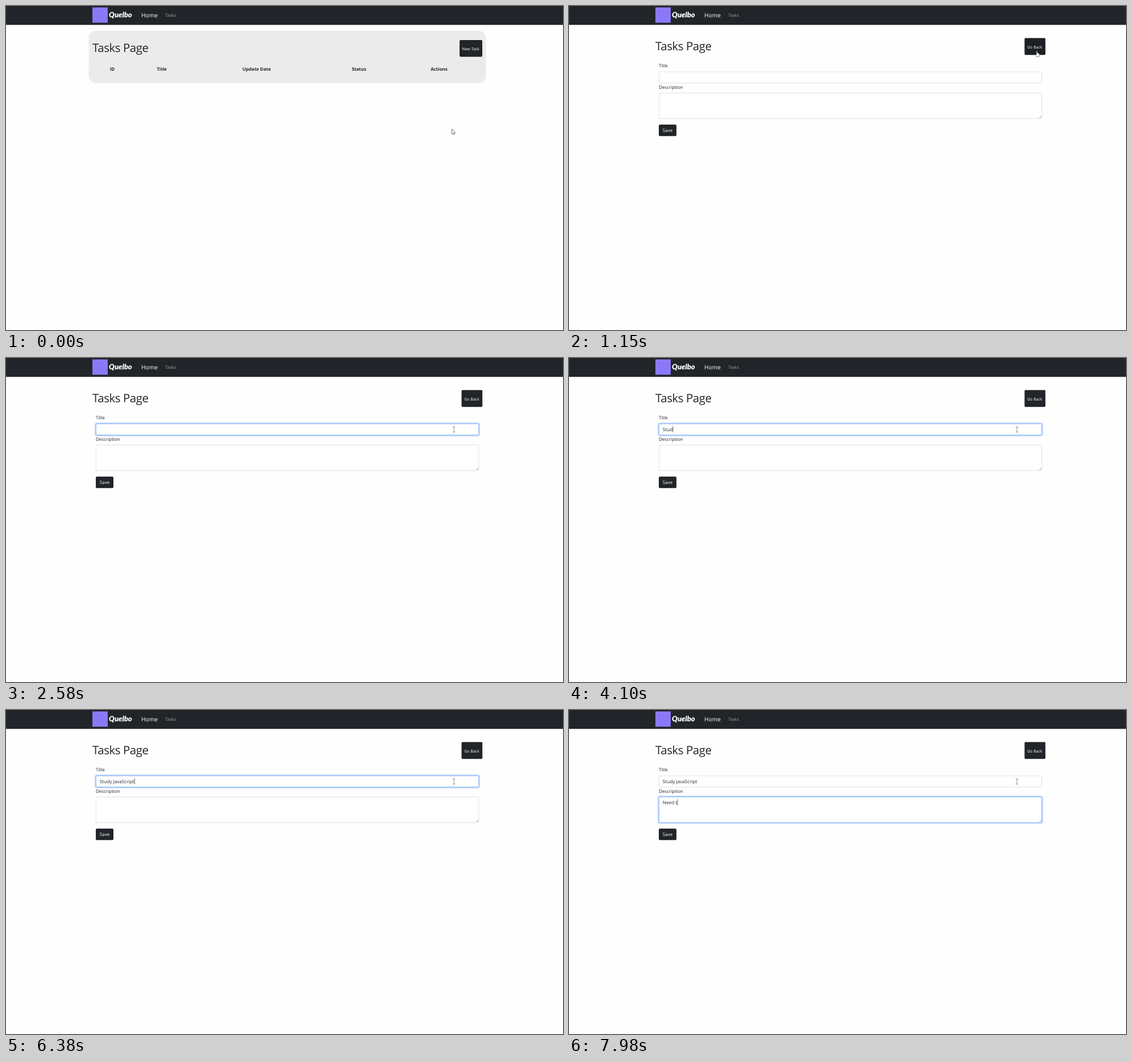
Recreate the animation shown at these times as an HTML page. Size 980 by 571 pixels, loop 8 s.

```html
<!DOCTYPE html>
<html lang="en">
<head>
<meta charset="utf-8">
<title>Tasks Page</title>
<style>
  html, body { margin: 0; width: 100%; height: 100%; overflow: hidden; background: #fefefe; }
  svg { display: block; width: 980px; height: 571px; }
  text { font: 8px "Open Sans", "Noto Sans", sans-serif; fill: #212529; white-space: pre; text-rendering: geometricPrecision; }
  .brand { font: italic 900 13px Lato, sans-serif; fill: #fff; }
  .h1 { font-size: 20.4px; font-weight: 500; letter-spacing: -.02em; }
  .head text { font-weight: 700; font-size: 7.95px; text-anchor: middle; }
  .small { font-size: 6.95px; fill: #fff; }
  .typed { font-size: 8.2px; }
  .light { fill: #fff; }
  .dark { fill: #212529; }
  .grid { fill: none; stroke: #e2e4e6; stroke-width: .8; }
  .field { fill: #fff; stroke: #ced4da; stroke-width: .7; }
  .focus { fill: none; }
  .edge { stroke: #86b7fe; stroke-width: .8; }
  .glow { stroke: #0d6efd; stroke-opacity: .25; stroke-width: 2.1; }
</style>
</head>
<body>
<svg viewBox="0 0 980 571">
  <rect class="dark" width="980" height="33.3"/>
  <rect x="152" y="2.5" width="27" height="27" fill="#8a78f6"/>
  <text class="brand" x="181" y="20">Quelbo</text>
  <text class="light" x="238" y="20" style="font-size:10.2px">Home</text>
  <text x="280" y="19" style="font-size:7.7px;fill:#9b9da0">Tasks</text>

  <g id="list">
    <rect x="145.5" y="43.7" width="699" height="92.3" rx="13" fill="#ebebeb"/>
    <text class="h1" x="152" y="81">Tasks Page</text>
    <rect id="newRing" x="797" y="59" width="42" height="31.4" rx="2.6" fill="none" stroke="#424649" stroke-opacity=".6" stroke-width="2.1"/>
    <rect id="newButton" x="798" y="60" width="40" height="29.5" rx="2"/>
    <text class="small" x="802.3" y="77.6">New Task</text>
    <path class="grid" d="M152 99.5H838V122.5H152ZM222 99.5v23M326 99.5v23M556 99.5v23M687 99.5v23"/>
    <g class="head">
      <text x="187" y="114.3">ID</text>
      <text x="274" y="114.3">Title</text>
      <text x="441" y="114.3">Update Date</text>
      <text x="621" y="114.3">Status</text>
      <text x="762" y="114.3">Actions</text>
    </g>
  </g>

  <g id="form">
    <text class="h1" x="152" y="78">Tasks Page</text>
    <rect id="backButton" x="801.5" y="56.5" width="36.7" height="29.7" rx="2"/>
    <text class="small" x="806.2" y="74.5">Go Back</text>
    <text x="158" y="108.4">Title</text>
    <rect class="field" x="158.3" y="116" width="673.4" height="19.8" rx="2.1"/>
    <g class="focus" id="titleFocus">
      <rect class="glow" x="157" y="114.9" width="676" height="22" rx="3"/>
      <rect class="edge" x="158.3" y="116" width="673.4" height="19.8" rx="2.1"/>
    </g>
    <text class="typed" id="titleText" x="164.8" y="129"></text>
    <text x="158" y="145.5">Description</text>
    <rect class="field" x="158.3" y="153.2" width="673.4" height="45.2" rx="2.1"/>
    <g class="focus" id="noteFocus">
      <rect class="glow" x="157" y="152.1" width="676" height="47.4" rx="3"/>
      <rect class="edge" x="158.3" y="153.2" width="673.4" height="45.2" rx="2.1"/>
    </g>
    <path d="M827 197.5l4-4M829.2 197.5l1.8-1.8" stroke="#777" stroke-width=".6"/>
    <text class="typed" id="noteText" x="164.8" y="166"></text>
    <rect id="caret" width=".7" height="10.6" fill="#222"/>
    <rect class="dark" x="158" y="209" width="31" height="20.2" rx="2"/>
    <text class="light" x="164.8" y="222">Save</text>
  </g>

  <path id="arrow" d="M0 0V8.8L2 7L3.4 10.1L4.7 9.5L3.4 6.5H6Z" fill="#fff" stroke="#222" stroke-width=".6"/>
  <path id="hand" d="M-.9 1Q0-.6.9 1V4L3.8 4.8Q4.7 5.3 4.4 7L3.6 10.5H-.8L-3 6.8Q-2.6 5.6-.9 7Z" fill="#fff" stroke="#111" stroke-width=".5"/>
  <path id="beam" d="M-2-4.5H2M0-4.5V4.5M-2 4.5H2" fill="none" stroke="#777" stroke-width=".8"/>
</svg>
<script>
const LOOP = 8000, STEP = 70;
const $ = id => document.getElementById(id);
const clamp = v => Math.max(0, Math.min(1, v));
const show = (id, on) => $(id).style.display = on ? "" : "none";

const fields = {
  title: { text: "Study JavaScript", y: 120.2, focus: 2040, blur: 6710,
    keys: [3310, 3840, 3950, 4070, 4180, 4300, 4710, 4840, 5100, 5170, 5570, 5840, 6040, 6110, 6310, 6380] },
  note: { text: "Need t", y: 157.5, focus: 6710, blur: LOOP + STEP,
    keys: [7130, 7260, 7390, 7590, 7720, 7980] }
};

// Two pointer moves, each advancing in discrete steps
const moves = [
  { start: 240, step: 70, count: 11, from: [784.5, 217], to: [823.3, 79] },
  { start: 1480, step: 72, count: 6, from: [823.3, 79], to: [788, 126] }
];

function pointerAt(t) {
  const m = moves[t < moves[1].start ? 0 : 1];
  const p = clamp((Math.floor((t - m.start) / m.step) + 1) / m.count);
  const e = p * p * (3 - 2 * p);
  return m.from.map((v, i) => v + (m.to[i] - v) * e);
}

// Focus fade, sampled at the screen's refresh step
function fade(t, start) {
  return t < start ? 0 : clamp((Math.floor((t - start) / STEP) * STEP + 30) / 160);
}

function drawField(name, t) {
  const f = fields[name], label = $(name + "Text");
  const typed = f.keys.filter(k => k <= t);
  label.textContent = f.text.slice(0, typed.length);
  $(name + "Focus").style.opacity = fade(t, f.focus) * (1 - fade(t, f.blur));
  if (t < f.focus || t >= f.blur) return;
  const last = typed.length ? typed[typed.length - 1] : f.focus + 10;
  const width = typed.length ? label.getComputedTextLength() : 0;
  $("caret").setAttribute("x", 165.1 + width);
  $("caret").setAttribute("y", f.y);
  show("caret", Math.floor((t - last) / 530) % 2 < 1);
}

function draw(t) {
  const onList = t < 1150;
  const [x, y] = pointerAt(t);
  const over = onList ? x > 798 && y < 89.5 : x > 801.5 && y < 86.2;
  const inField = !onList && y > 116;
  show("list", onList);
  show("form", !onList);
  show("newRing", t >= 1080);
  const fill = over ? "#1c1f23" : "#212529";
  $("newButton").style.fill = $("backButton").style.fill = fill;
  show("caret", false);
  for (const name in fields) drawField(name, t);
  const kind = over ? "hand" : inField ? "beam" : "arrow";
  for (const id of ["arrow", "hand", "beam"]) show(id, id === kind);
  $(kind).setAttribute("transform", `translate(${x} ${y})`);
}

const begin = performance.now();
function tick() {
  draw((performance.now() - begin) % LOOP);
  requestAnimationFrame(tick);
}
tick();
</script>
</body>
</html>
```
